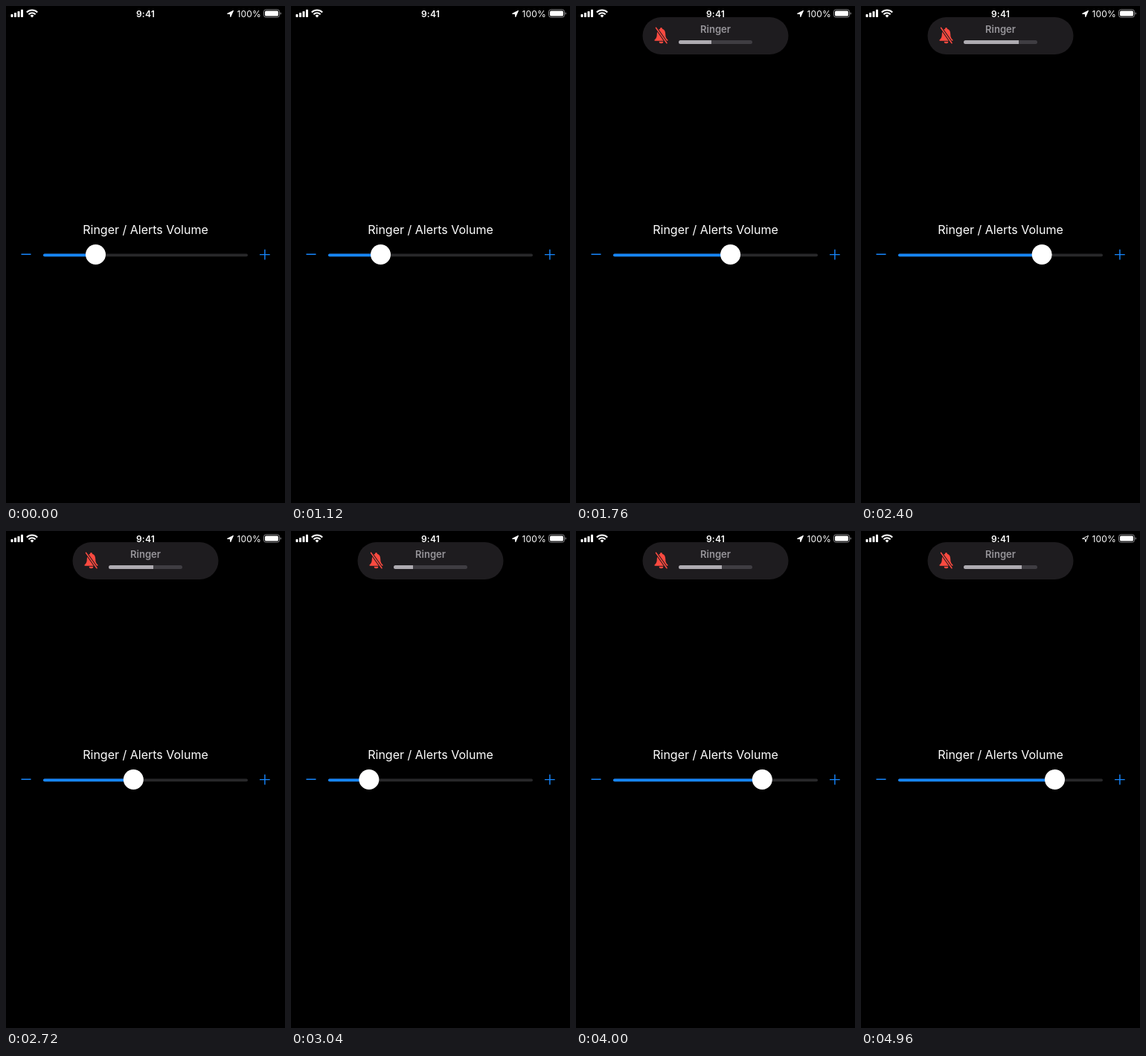
These frames come from a looping animation (375 by 667 pixels, 5920 ms). An HTML page:

```html
<!DOCTYPE html>
<html lang="en">
<head>
<meta charset="utf-8">
<title>Ringer volume</title>
<style>
  html, body { margin: 0; width: 100%; height: 100%; overflow: hidden; background: #000; }
  svg { display: block; width: 375px; height: 667px; }
  text { font-family: Inter, Roboto, sans-serif; fill: #fff; }
  .time { font-size: 12px; font-weight: 600; letter-spacing: .25px; text-anchor: middle; }
  .charge { font-size: 12px; letter-spacing: .2px; text-anchor: end; }
  .title { font-size: 16px; text-anchor: middle; }
  .label { font-size: 13px; font-weight: 600; text-anchor: middle; fill: #97959a; }
  .blue { stroke: #1686fe; stroke-width: 1.4; fill: none; }
  .white { fill: #fff; }
  .red { fill: #fb4a40; }
</style>
</head>
<body>
<svg viewBox="0 0 375 667">
  <defs>
    <clipPath id="barShape"><rect x="138" y="31" width="99" height="5" rx="2.5"/></clipPath>
  </defs>

  <!-- Status bar -->
  <g class="white">
    <rect x="6.5" y="11" width="3" height="4" rx=".7"/>
    <rect x="11" y="9" width="3" height="6" rx=".7"/>
    <rect x="15.5" y="7" width="3" height="8" rx=".7"/>
    <rect x="20" y="4.7" width="3" height="10.3" rx=".7"/>
    <path d="M35 15.5l-2.4-2.5a3.5 3.5 0 0 1 4.8 0z"/>
  </g>
  <g fill="none" stroke="#fff" stroke-width="2">
    <path d="M30.4 11.2a6.6 6.6 0 0 1 9.2 0"/>
    <path d="M27.8 8.5a10.3 10.3 0 0 1 14.4 0"/>
  </g>
  <text class="time" x="187.5" y="14.5">9:41</text>
  <path id="arrow" d="M305.5 6.3L297.5 10.3L301.4 10.8L301.8 14.6Z" stroke="#fff" stroke-width="1" stroke-linejoin="round"/>
  <text class="charge" x="343" y="14.5">100%</text>
  <rect x="346.5" y="4.9" width="21" height="10.2" rx="2.8" fill="none" stroke="#858588"/>
  <rect class="white" x="348" y="6.4" width="18" height="7.2" rx="1.5"/>
  <path d="M368.6 8.2q1.4.5 1.4 1.8t-1.4 1.8z" fill="#858588"/>

  <!-- Slider -->
  <text class="title" x="187.5" y="306">Ringer / Alerts Volume</text>
  <path class="blue" d="M20.5 333.3h13M341 333.6h13.7M347.9 326.8v13.7"/>
  <rect x="50" y="332.6" width="275" height="3.6" rx="1.8" fill="#28282a"/>
  <rect id="track" x="50" y="332.6" height="3.6" rx="1.8" fill="#1686fe"/>
  <circle id="thumb" class="white" cy="333.5" r="13.5"/>

  <!-- Volume banner -->
  <g id="banner">
    <rect x="89.5" width="196" height="50" rx="25" fill="#1e1c1f"/>
    <path class="red" d="M105.5 30.5c2.5-2 3.3-4 3.3-8c0-4 1.8-6.2 4.2-6.8c0-2.2 3-2.2 3 0c2.4.6 4.2 2.8 4.2 6.8c0 4 .8 6 3.3 8q.5 1.3-1 1.3h-16q-1.5 0-1-1.3z"/>
    <path class="red" d="M111.7 32.8h5.6a2.8 2.5 0 0 1-5.6 0z"/>
    <path d="M107.5 14.2L122 34.8" stroke="#1e1c1f" stroke-width="3.6"/>
    <path d="M107.5 14.2L122 34.8" stroke="#fb4a40" stroke-width="1.5" stroke-linecap="round"/>
    <text class="label" x="187.5" y="21">Ringer</text>
    <g clip-path="url(#barShape)">
      <rect x="138" y="31" width="99" height="5" fill="#3f3d42"/>
      <rect id="level" x="138" y="31" height="5" fill="#aeabb1"/>
    </g>
  </g>
</svg>
<script>
const LOOP = 5920, STEP = 80, LAG = 160;

const easeInOut = u => (1 - Math.cos(Math.PI * u)) / 2;
const easeOut = u => 1 - (1 - u) ** 3;

// Each drag eases the thumb from where it rests to a new place.
const REST = 120.5;
const drags = [
  { from: 1140, until: 2150, to: 249.5 },
  { from: 2290, until: 3120, to: 101.5 },
  { from: 3360, until: 4160, to: 266 },
  { from: 4160, until: 4480, to: 260.5 }
];

const [arrow, track, thumb, banner, level] =
  ['arrow', 'track', 'thumb', 'banner', 'level'].map(id => document.getElementById(id));

const progress = (t, from, until) => Math.min(1, Math.max(0, (t - from) / (until - from)));

const thumbAt = t => drags.reduce(
  (x, { from, until, to }) => x + (to - x) * easeInOut(progress(t, from, until)), REST);

const bannerAt = t => -52 + 67 * easeOut(progress(t, 1200, 1600));

function draw(now) {
  const t = Math.floor((now % LOOP) / STEP) * STEP;
  const x = thumbAt(t);
  thumb.setAttribute('cx', x);
  track.setAttribute('width', x - 50);

  // The banner's level trails the thumb.
  const volume = (thumbAt(t - LAG) - 63.5) / 248;
  level.setAttribute('width', Math.round(volume * 98));
  banner.setAttribute('transform', `translate(0 ${bannerAt(t)})`);
  arrow.setAttribute('fill', t < 4720 ? '#fff' : 'none');
}

const start = performance.now();
function tick() {
  draw(performance.now() - start);
  requestAnimationFrame(tick);
}
tick();
</script>
</body>
</html>
```
